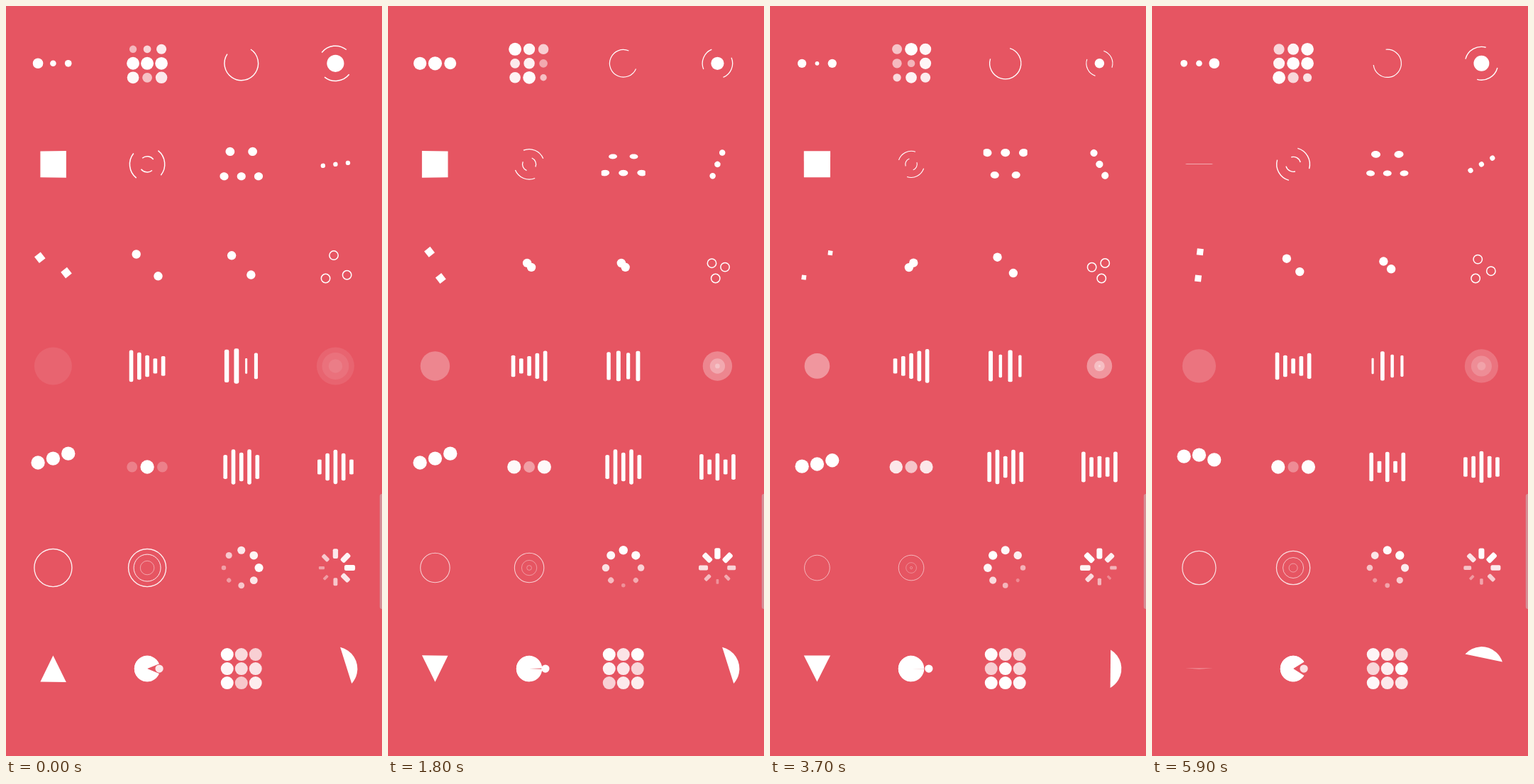
Animation of 530x1056 px, one loop 6 s. Source, as an HTML page with a canvas:

```html
<!DOCTYPE html>
<html lang="en">
<head>
<meta charset="utf-8">
<title>Loading indicators</title>
<style>
html, body { margin: 0; width: 100%; height: 100%; overflow: hidden; background: #e65562; }
canvas { display: block; width: 530px; height: 1056px; }
</style>
</head>
<body>
<canvas id="stage"></canvas>
<script>
const WIDTH = 530, HEIGHT = 1056, LOOP = 6000, STEP = 100;
const START = 11915;            // age of the indicators when the loop begins
const W = 62, H = W / 2;        // indicator size and half size
const GAP = 2, LINE = 1.5, CORNER = 2.45, CAMERA = 283;
const TAU = Math.PI * 2;

const canvas = document.getElementById('stage');
const ctx = canvas.getContext('2d');
const dpr = window.devicePixelRatio || 1;
canvas.width = WIDTH * dpr;
canvas.height = HEIGHT * dpr;

let now = START;

// --- timing ---
const ease = x => 0.5 - 0.5 * Math.cos(Math.PI * x);
const phase = (dur, delay = 0) => ((now - Math.max(0, delay)) / dur) % 1;

function keys(values, u) {
  const pos = u * (values.length - 1);
  const i = Math.min(Math.floor(pos), values.length - 2);
  return values[i] + (values[i + 1] - values[i]) * (pos - i);
}
const linear = (dur, ...values) => keys(values, phase(dur));
const eased = (dur, delay, ...values) => keys(values, ease(phase(dur, delay)));

// --- drawing ---
function at(x, y, draw, { scale = 1, scaleY = scale, turn = 0, alpha = 1 } = {}) {
  ctx.save();
  ctx.translate(x, y);
  ctx.scale(scale, scaleY);
  ctx.rotate(turn * Math.PI / 180);
  ctx.globalAlpha = alpha;
  draw();
  ctx.restore();
}

function disc(x, y, r) {
  ctx.beginPath();
  ctx.arc(x, y, r, 0, TAU);
  ctx.fill();
}

function ring(x, y, r, width = LINE) {
  ctx.lineWidth = width;
  ctx.beginPath();
  ctx.arc(x, y, r, 0, TAU);
  ctx.stroke();
}

function arc(r, start, sweep) {
  ctx.lineWidth = LINE;
  ctx.beginPath();
  ctx.arc(0, 0, r, start * Math.PI / 180, (start + sweep) * Math.PI / 180);
  ctx.stroke();
}

function sector(r, start, sweep) {
  ctx.beginPath();
  ctx.moveTo(0, 0);
  ctx.arc(0, 0, r, start * Math.PI / 180, (start + sweep) * Math.PI / 180);
  ctx.closePath();
  ctx.fill();
}

function bar(x, y, w, h) {
  ctx.beginPath();
  ctx.roundRect(x, y, w, h, CORNER);
  ctx.fill();
}

// Polygon turned around the X and Y axes, seen in perspective
function solid(points, degX, degY) {
  const a = degX * Math.PI / 180, b = degY * Math.PI / 180;
  ctx.beginPath();
  for (const [x, y] of points) {
    const z = -x * Math.sin(b);
    const depth = y * Math.sin(a) + z * Math.cos(a);
    const k = CAMERA / (CAMERA - depth);
    ctx.lineTo(x * Math.cos(b) * k, (y * Math.cos(a) - z * Math.sin(a)) * k);
  }
  ctx.closePath();
  ctx.fill();
}

function flip(points) {
  solid(points, linear(2500, 0, 180, 180, 0, 0), linear(2500, 0, 0, 180, 180, 0));
}

// --- shared layouts ---
function trio(pose) {
  const r = (W - 2 * GAP) / 6;
  for (let i = 0; i < 3; i++) {
    const { y = 0, ...style } = pose(i, r);
    at((i - 1) * (2 * r + GAP), y, () => disc(0, 0, r), style);
  }
}

function grid(pose) {
  const r = (W - 4 * GAP) / 6, pitch = 2 * r + GAP;
  for (let i = 0; i < 9; i++) {
    at((i % 3 - 1) * pitch, (Math.floor(i / 3) - 1) * pitch, () => disc(0, 0, r), pose(i));
  }
}

function bars(count, pose) {
  const w = W / (2 * count + 1);
  for (let i = 0; i < count; i++) {
    at((1.5 + 2 * i) * w - H, 0, () => bar(-w / 2, -W / 2.5, w, W / 1.25), pose(i));
  }
}

function spokes(dist, draw) {
  [0, 120, 240, 360, 480, 600, 720, 780].forEach((delay, i) => {
    const a = i * Math.PI / 4;
    at(dist * Math.cos(a), dist * Math.sin(a), draw, {
      scale: eased(1000, delay, 1, 0.4, 1),
      alpha: eased(1000, delay, 255, 77, 255) / 255,
      turn: i * 45
    });
  });
}

// Each later circle is drawn inside the scale of the one before it
function nested(delays, alpha, draw) {
  let scale = 1;
  for (const delay of delays) {
    scale *= phase(1000, delay);
    at(0, 0, () => draw(29 * scale, scale), { alpha });
  }
}
const fill = r => disc(0, 0, r);
const outline = (r, scale) => ring(0, 0, r, Math.max(0.5, LINE * scale));

const R = W / 10, ARC = H - 6, SIDE = W * 0.3, ZIG = W / 3;

const indicators = [
  function ballPulse() {
    trio(i => ({ scale: eased(750, 120 * (i + 1), 1, 0.3, 1) }));
  },
  function ballGridPulse() {
    const durs = [720, 1020, 1280, 1420, 1450, 1180, 870, 1450, 1060];
    const delays = [-60, 250, -170, 480, 310, 30, 460, 780, 450];
    grid(i => ({
      scale: eased(durs[i], delays[i], 1, 0.5, 1),
      alpha: eased(durs[i], delays[i], 255, 210, 122, 255) / 255
    }));
  },
  function clipRotate() {
    at(0, 0, () => arc(ARC, -45, 270), {
      scale: eased(750, 0, 1, 0.6, 0.5, 1), turn: eased(750, 0, 0, 360)
    });
  },
  function clipRotatePulse() {
    disc(0, 0, H / 2.5 * eased(1000, 0, 1, 0.3, 1));
    at(0, 0, () => { arc(ARC, 225, 90); arc(ARC, 45, 90); }, {
      scale: eased(1000, 0, 1, 0.6, 1), turn: eased(1000, 0, 0, 360)
    });
  },
  function squareSpin() {
    flip([[-SIDE, -SIDE], [SIDE, -SIDE], [SIDE, SIDE], [-SIDE, SIDE]]);
  },
  function clipRotateMultiple() {
    const scale = eased(1000, 0, 1, 0.6, 1), turn = eased(1000, 0, 0, 360);
    const inner = H / 1.8 - 6;
    at(0, 0, () => { arc(ARC, 135, 90); arc(ARC, -45, 90); }, { scale, turn });
    at(0, 0, () => { arc(inner, 225, 90); arc(inner, 45, 90); }, { scale, turn: -turn });
  },
  function pulseRise() {
    const deg = linear(1500, 0, 360), y = H - 2 * R;
    ctx.beginPath();
    ctx.rect(-H, -H - 10, W, W + 20);
    ctx.clip();
    for (const [cx, cy] of [[-W / 4, -y], [W / 4, -y], [R - H, y], [0, y], [H - R, y]]) {
      const rim = Array.from({ length: 40 }, (_, i) =>
        [cx + R * Math.cos(i * TAU / 40), cy + R * Math.sin(i * TAU / 40)]);
      solid(rim, deg, 0);
    }
  },
  function ballRotate() {
    const r = R * eased(1000, 0, 0.5, 1, 0.5);
    at(0, 0, () => {
      for (const x of [-17.7, 0, 17.7]) disc(x, 0, r);
    }, { turn: eased(1000, 0, 0, 360) });
  },
  function cubeTransition() {
    const x = linear(1600, -SIDE, SIDE, SIDE, -SIDE, -SIDE);
    const y = linear(1600, -SIDE, -SIDE, SIDE, SIDE, -SIDE);
    const pose = { scale: linear(1600, 1, 0.5, 1, 0.5, 1), turn: linear(1600, 0, 720) };
    const cube = () => ctx.fillRect(-R, -R, 2 * R, 2 * R);
    at(x, y, cube, pose);
    at(-x, -y, cube, pose);
  },
  function zigZag() {
    const x = linear(1000, -ZIG, ZIG, 0, -ZIG), y = linear(1000, -ZIG, -ZIG, 0, -ZIG);
    disc(x, y, R);
    disc(-x, -y, R);
  },
  function zigZagDeflect() {
    const x = linear(2000, -ZIG, ZIG, -ZIG, ZIG, -ZIG);
    const y = linear(2000, -ZIG, -ZIG, ZIG, ZIG, -ZIG);
    disc(x, y, R);
    disc(-x, -y, R);
  },
  function trianglePath() {
    for (let i = 0; i < 3; i++) {
      const u = (phase(2000) + i / 3) % 1;
      ring(keys([0, SIDE, -SIDE, 0], u), keys([-SIDE, SIDE, SIDE, -SIDE], u), R);
    }
  },
  function ballScale() {
    nested([0], 1 - phase(1000), fill);
  },
  function lineScale() {
    bars(5, i => ({ scale: 1, scaleY: eased(1000, 100 * (i + 1), 1, 0.4, 1) }));
  },
  function lineScaleParty() {
    const durs = [1260, 430, 1010, 730], delays = [770, 290, 280, 740];
    bars(4, i => ({ scale: eased(durs[i], delays[i], 1, 0.4, 1) }));
  },
  function ballScaleMultiple() {
    nested([0, 200, 400], 1 - phase(1000), fill);
  },
  function pulseSync() {
    trio((i, r) => ({ y: eased(600, 70 * (i + 1), 0, -2 * r, 0) }));
  },
  function ballBeat() {
    const delays = [350, 0, 350];
    trio(i => ({
      scale: eased(700, delays[i], 1, 0.75, 1),
      alpha: eased(700, delays[i], 1, 0.2, 1)
    }));
  },
  function pulseOut() {
    bars(5, i => ({ scale: 1, scaleY: eased(900, 250 * Math.abs(i - 2), 1, 0.3, 1) }));
  },
  function pulseOutRapid() {
    bars(5, i => ({ scale: 1, scaleY: eased(1000, 200 * Math.abs(i - 2), 1, 0.4, 1) }));
  },
  function ripple() {
    nested([0], phase(1000), outline);
  },
  function rippleMultiple() {
    nested([0, 200, 400], phase(1000), outline);
  },
  function ballSpinFade() {
    spokes(H - R, () => disc(0, 0, R));
  },
  function lineSpinFade() {
    spokes(W / 2.5 - R, () => bar(-R, -R / 1.5, 2.5 * R, R / 0.75));
  },
  function triangleSkewSpin() {
    flip([[-SIDE, SIDE], [SIDE, SIDE], [0, -SIDE]]);
  },
  function muncher() {
    const r = H / 1.7, open = eased(650, 0, 0, 45, 0);
    at(0, 0, () => sector(r, 0, 270), { turn: open });
    at(0, 0, () => sector(r, 90, 270), { turn: -open });
    at(linear(650, H - W / 11, 0), 0, () => disc(0, 0, W / 11), {
      alpha: eased(650, 0, 255, 122) / 255
    });
  },
  function gridBeat() {
    const durs = [960, 930, 1190, 1130, 1340, 940, 1200, 820, 1190];
    const delays = [360, 400, 680, 410, 710, -150, -120, 10, 320];
    grid(i => ({ alpha: eased(durs[i], delays[i], 255, 168, 255) / 255 }));
  },
  function semiCircleSpin() {
    at(0, 0, () => {
      ctx.beginPath();
      ctx.arc(0, 0, H, -Math.PI / 3, Math.PI / 3);
      ctx.fill();
    }, { turn: eased(600, 0, 0, 360) });
  }
];

function render(t) {
  now = START + t;
  ctx.setTransform(dpr, 0, 0, dpr, 0, 0);
  ctx.fillStyle = '#e65562';
  ctx.fillRect(0, 0, WIDTH, HEIGHT);

  // scroll bar
  ctx.fillStyle = 'rgba(200, 200, 200, 0.5)';
  ctx.beginPath();
  ctx.roundRect(526.8, 687, 8, 162, 3);
  ctx.fill();

  ctx.fillStyle = ctx.strokeStyle = '#fff';
  indicators.forEach((draw, i) => {
    at(66.4 + 132.67 * (i % 4), 80.8 + 142.05 * Math.floor(i / 4), draw);
  });
}

const begin = performance.now();
function frame() {
  const t = (performance.now() - begin) % LOOP;
  render(Math.floor(t / STEP) * STEP);
  requestAnimationFrame(frame);
}
frame();
</script>
</body>
</html>
```
